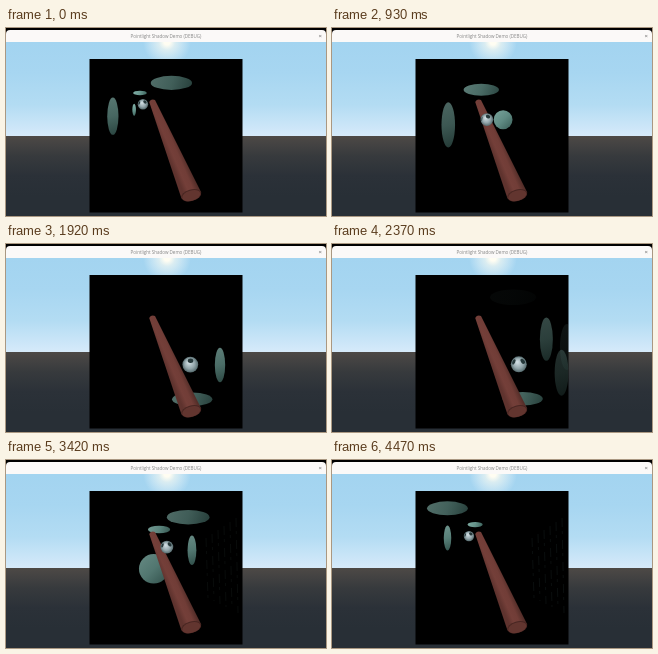
These frames come from a looping animation (320 by 188 pixels, 4.5 s). An HTML page with a canvas:

```html
<!DOCTYPE html>
<html lang="en">
<head>
<meta charset="utf-8">
<title>Pointlight Shadow Demo</title>
<style>
html, body { margin: 0; width: 100%; height: 100%; overflow: hidden; background: #000; }
#stage { position: relative; width: 320px; height: 188px; overflow: hidden; }
canvas { position: absolute; left: 0; top: 0; }
#bar {
  position: absolute; left: 0; top: 2px; width: 320px; height: 12px;
  border-radius: 4px 4px 0 0; background: #fbf9f8; color: #858585;
  font: 4.5px/12px "Open Sans", "Noto Sans", sans-serif; text-align: center;
}
#bar span { position: absolute; right: 4px; top: 0; font-size: 6px; color: #666; }
</style>
</head>
<body>
<div id="stage">
  <canvas width="320" height="188"></canvas>
  <div id="bar">Pointlight Shadow Demo (DEBUG)<span>×</span></div>
</div>
<script>
const ctx = document.querySelector('canvas').getContext('2d');
const LOOP = 4.5, TAU = Math.PI * 2;

// Foreshortening of a light spot on each kind of surface
const SIDE = [.3, 1], CEILING = [1, .34], BACK = [1, 1];

// Each beam sweeps its spot over one surface: seconds on and off, start and end point
const beams = [
  [CEILING, -.3, 1.4, [129, 66], [157, 60]],
  [SIDE, -.3, 1.5, [132, 77], [109, 106]],
  [SIDE, -.3, .5, [111, 87], [100, 90]],
  [CEILING, -.3, .7, [160, 57], [178, 50]],
  [BACK, .5, 1.4, [162, 86], [181, 98]],
  [SIDE, 1.4, 2.5, [196, 112], [234, 131]],
  [CEILING, 1.3, 3, [180, 156], [197, 154]],
  [SIDE, 2.2, 3.9, [219, 96], [173, 88]],
  [SIDE, 2.3, 3.3, [236, 104], [220, 90]],
  [CEILING, 2.3, 4.2, [181, 53], [183, 60]],
  [CEILING, 2.9, 4.8, [158, 72], [140, 63]],
  [BACK, 3, 3.9, [158, 114], [136, 103]],
  [SIDE, 3.5, 4.8, [120, 75], [114, 79]],
  [CEILING, 3.5, 4.8, [164, 58], [99, 45]]
];

const clamp = v => Math.max(0, Math.min(1, v));
const mix = (a, b, u) => a + (b - a) * u;

function gradient(x0, y0, x1, y1, ...colors) {
  const g = ctx.createLinearGradient(x0, y0, x1, y1);
  colors.forEach((c, i) => g.addColorStop(i / (colors.length - 1), c));
  return g;
}

function ellipse(x, y, rx, ry, rot, fill) {
  ctx.beginPath();
  ctx.ellipse(x, y, rx, ry, rot, 0, TAU);
  ctx.fillStyle = fill;
  ctx.fill();
}

// The ball circles in depth, so its path and size follow one angle.
function ballAt(t) {
  const a = TAU * (t + .05) / LOOP, c = Math.cos(a), s = Math.sin(a);
  return {
    x: 162 - 25 * c - 2.2 * s,
    y: 96 - 23 * c + 3 * s + 3 * Math.cos(2 * a),
    r: 6.6 - 1.4 * c
  };
}

function drawSky() {
  ctx.fillStyle = gradient(0, 14, 0, 108, '#a3d4f0', '#a7d6f1', '#b3dcf3', '#d6eafa');
  ctx.fillRect(0, 14, 320, 94);
  const sun = ctx.createRadialGradient(161, 14, 3, 161, 14, 24);
  sun.addColorStop(0, '#fffdf2');
  sun.addColorStop(.25, 'rgba(255,253,242,.6)');
  sun.addColorStop(1, 'rgba(255,255,255,0)');
  ctx.fillStyle = sun;
  ctx.fillRect(136, 14, 50, 26);
  ctx.fillStyle = gradient(0, 108, 0, 188, '#4d4946', '#373a3d', '#2b3138', '#282f36', '#282f36');
  ctx.fillRect(0, 108, 320, 80);
}

// Spots grow and dim with their distance from the ball.
function drawSpot([[wide, tall], on, off, from, to], t, ball) {
  const fade = clamp((t - on) / .25) * clamp((off - t) / .25);
  if (!fade) return;
  const u = (t - on) / (off - on);
  const x = mix(from[0], to[0], u), y = mix(from[1], to[1], u);
  const distance = Math.hypot(x - ball.x, y - ball.y);
  const size = Math.min(distance * .58, 23);
  ctx.globalAlpha = fade * clamp(1.1 - distance / 70);
  const fill = gradient(x - size * wide, y - size * tall, x + size * wide, y + size * tall, '#8abbb2', '#6fa198', '#416a63');
  ellipse(x, y, size * wide, size * tall, 0, fill);
  ctx.globalAlpha = 1;
}

function drawGlints(t) {
  ctx.strokeStyle = `rgba(110,150,145,${.16 * clamp((t - 3) * 2)})`;
  ctx.lineWidth = .6;
  ctx.setLineDash([9, 4, 3, 6]);
  for (let i = 0; i < 6; i++) {
    ctx.beginPath();
    ctx.moveTo(200 + i * 6, 78 - i * 4);
    ctx.lineTo(202 + i * 6, 138 + i * 3);
    ctx.stroke();
  }
  ctx.setLineDash([]);
}

function drawPole() {
  ctx.beginPath();
  ctx.moveTo(143.2, 74);
  ctx.quadraticCurveTo(145, 70.5, 149, 72);
  ctx.lineTo(195, 164);
  ctx.lineTo(175.5, 170.5);
  ctx.closePath();
  ctx.fillStyle = gradient(160, 124, 174, 118, '#5f332e', '#743f39', '#713d37', '#542e29');
  ctx.fill();
  ellipse(185.3, 167.3, 10.2, 5.8, -.28, '#472521');
  ellipse(185.3, 167.6, 9.4, 5.1, -.28, '#62352f');
}

function drawBall(t, { x, y, r }) {
  const shade = ctx.createRadialGradient(x - r * .2, y - r * .3, r * .1, x, y, r);
  shade.addColorStop(0, '#cddbe0');
  shade.addColorStop(.6, '#93a6ab');
  shade.addColorStop(1, '#566b6e');
  ellipse(x, y, r, r, 0, shade);

  // Four openings around the turning, tilted ball
  for (let i = 0; i < 4; i++) {
    const angle = TAU * (t / LOOP + i / 4) + .5;
    const dx = Math.sin(angle), depth = Math.cos(angle) * .8, dy = -Math.cos(angle) * .6;
    if (depth > .05) {
      ellipse(x + dx * r * .8, y + dy * r * .8, r * .36 * depth, r * .36, Math.atan2(dy, dx), '#26383a');
    }
  }
}

function draw(t) {
  const ball = ballAt(t);
  ctx.fillStyle = '#000';
  ctx.fillRect(0, 0, 320, 188);
  drawSky();
  ctx.save();
  ctx.beginPath();
  ctx.rect(83.5, 31, 153, 153.5);
  ctx.clip();
  ctx.fillStyle = '#000';
  ctx.fillRect(83, 30, 155, 156);
  beams.forEach(beam => drawSpot(beam, t, ball));
  drawGlints(t);
  drawPole();
  drawBall(t, ball);
  ctx.restore();
}

const start = performance.now();
function tick() {
  draw((performance.now() - start) / 1000 % LOOP);
  requestAnimationFrame(tick);
}
tick();
</script>
</body>
</html>
```
